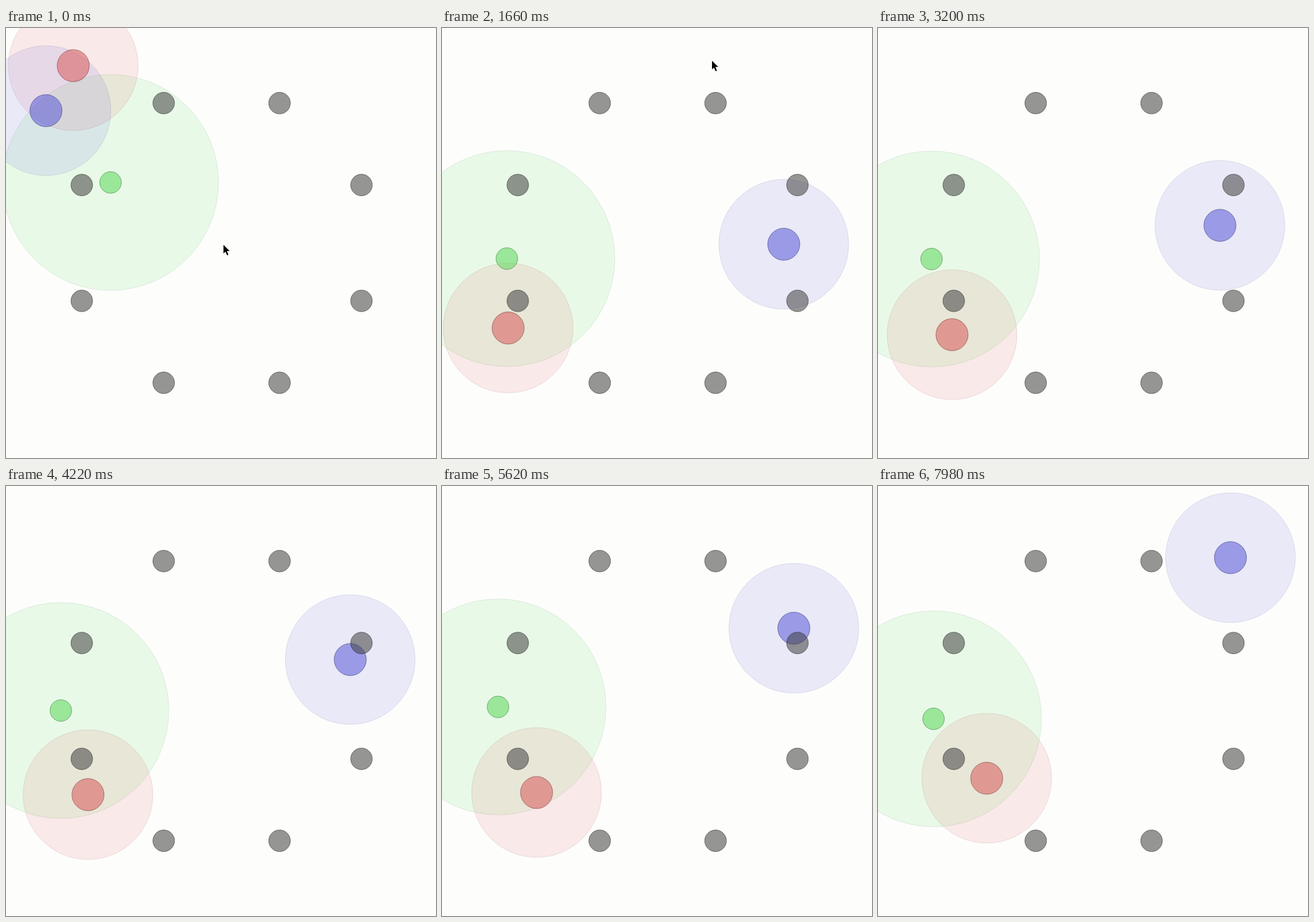
Write an HTML page with a canvas that moves like this. It is 696x696 px and loops after 8 s.

```html
<!DOCTYPE html>
<html lang="en">
<head>
<meta charset="utf-8">
<title>Agents and landmarks</title>
<style>
html, body { margin: 0; width: 100%; height: 100%; overflow: hidden; background: #fdfdfc; }
canvas { display: block; }
</style>
</head>
<body>
<canvas id="stage" width="696" height="696"></canvas>
<script>
const ctx = document.getElementById('stage').getContext('2d');
const { sin, cos, exp, max, min, PI } = Math;
const SIZE = 696, LOOP = 8000, RESET = 420, DRIFT_START = 1660, CURSOR_EXIT = 2400;
const GREY = [64, 64, 64];

// Each agent waits at `start`, is reset, then drifts; u runs from 0 to 1.
const agents = [
  {
    color: [89, 217, 89], radius: 17.5, range: 174.7, start: [169.2, 250],
    drift: u => [90 + 15 * exp(-5 * u) * cos(10 * u), 367 + 10 * cos(7 * u - 0.9)]
  },
  {
    color: [217, 89, 89], radius: 26, range: 105, start: [108.8, 61],
    drift: u => [107 + 69 * u - 4 * sin(2 * PI * u), 485.6 - 12.6 * u + 20 * sin(PI * u)]
  },
  {
    color: [89, 89, 217], radius: 26, range: 105, start: [64.7, 133.8],
    drift: u => [
      553.2 + 17.3 / (1 + exp(8.5 - 18 * u)),
      350 - 139 * u - 95 * u * u + 4.5 * (1 - cos(4 * PI * u))
    ]
  }
];

const landmarks = Array.from({ length: 8 }, (_, i) => {
  const angle = (i + 0.5) * PI / 4;
  return [349 + 245 * cos(angle), 347.9 + 245 * sin(angle)];
});

const rgba = (color, alpha) => `rgba(${color.join()},${alpha})`;

// Translucent disc with an edge of half its brightness.
function disc([x, y], radius, color, alpha) {
  ctx.beginPath();
  ctx.arc(x, y, radius, 0, 2 * PI);
  ctx.fillStyle = rgba(color, alpha);
  ctx.fill();
  ctx.strokeStyle = rgba(color.map(c => c / 2), alpha);
  ctx.lineWidth = 1;
  ctx.stroke();
}

function mix([x0, y0], [x1, y1], k) {
  return [x0 + (x1 - x0) * k, y0 + (y1 - y0) * k];
}

// The pointer slows down near the top, then leaves the stage.
function cursorAt(t) {
  const rest = [437, 53];
  if (t > DRIFT_START) {
    return mix(rest, [450, -24], (t - DRIFT_START) / (CURSOR_EXIT - DRIFT_START));
  }
  const k = max(0, (t - RESET) / (DRIFT_START - RESET));
  return mix([352, 351], rest, 1 - (1 - k) ** 1.5);
}

function drawCursor([x, y]) {
  const outline = [[0, 0], [0, 14], [3, 11], [6, 17], [8, 16], [5.5, 10], [10, 10]];
  ctx.beginPath();
  outline.forEach(([dx, dy]) => ctx.lineTo(x + dx, y + dy));
  ctx.closePath();
  ctx.strokeStyle = '#fff';
  ctx.lineWidth = 1.5;
  ctx.stroke();
  ctx.fillStyle = '#000';
  ctx.fill();
}

function draw(t) {
  const u = min(1, max(0, (t - DRIFT_START) / (LOOP - 20 - DRIFT_START)));
  const places = agents.map(a => t < RESET ? a.start : a.drift(u));

  ctx.fillStyle = '#fdfdfc';
  ctx.fillRect(0, 0, SIZE, SIZE);
  agents.forEach((a, i) => disc(places[i], a.range, a.color, 0.12));
  agents.forEach((a, i) => disc(places[i], a.radius, a.color, 0.54));
  landmarks.forEach(p => disc(p, 17.5, GREY, 0.55));
  if (t < CURSOR_EXIT) drawCursor(cursorAt(t));
}

function tick(now) {
  draw(now % LOOP);
  requestAnimationFrame(tick);
}
draw(0);
requestAnimationFrame(tick);
</script>
</body>
</html>
```
